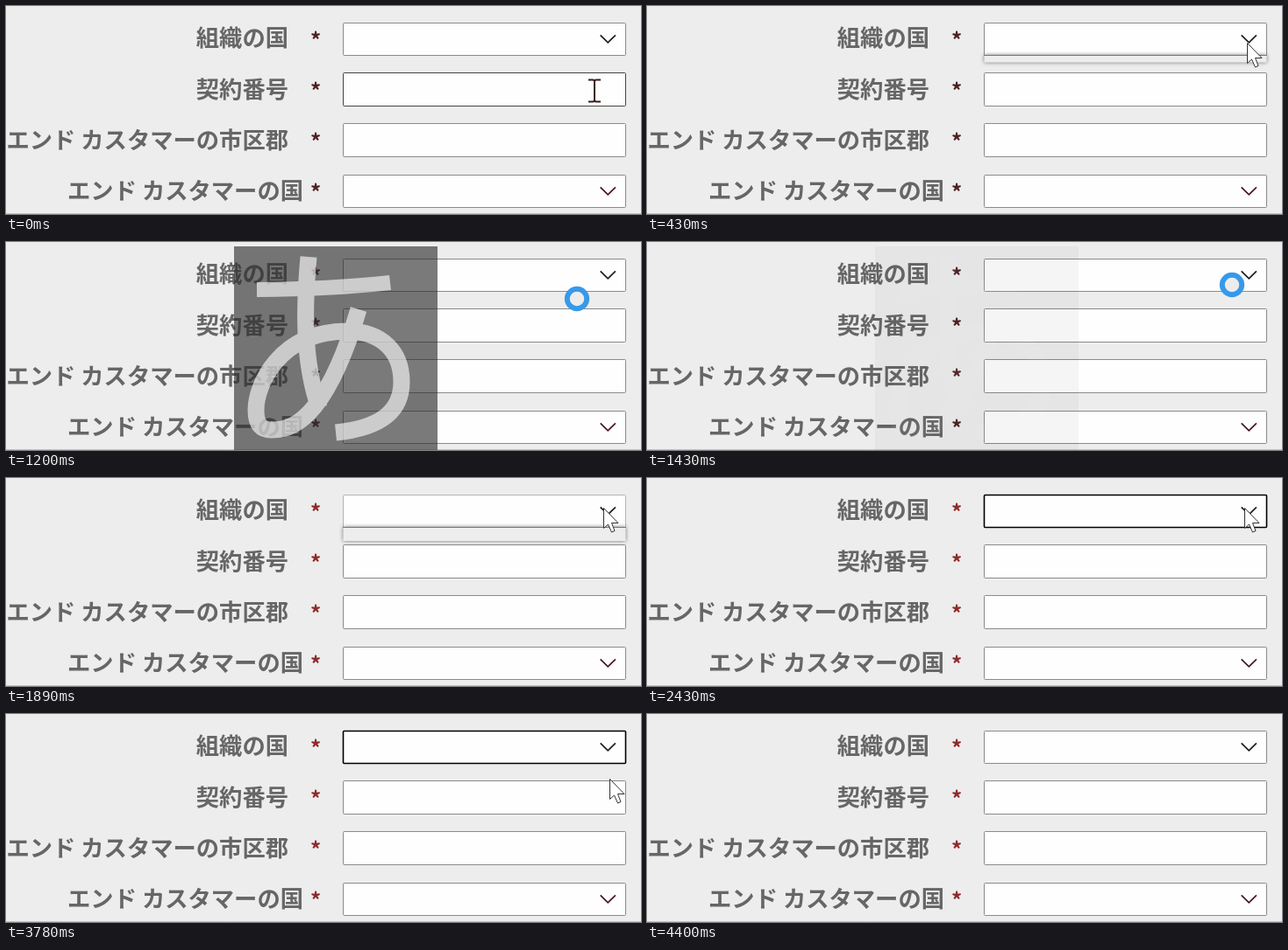
An HTML page for the animation above (4.48 s loop, 724x238 px).

```html
<!DOCTYPE html>
<html lang="ja">
<head>
<meta charset="utf-8">
<style>
  html, body { margin: 0; width: 100%; height: 100%; overflow: hidden; background: #ededed; }
  svg { display: block; width: 724px; height: 238px; }
  text { font: 700 26.3px "Noto Sans CJK JP", "Noto Sans CJK", sans-serif; fill: #666; text-anchor: end; }
  .star { font-size: 24px; text-anchor: middle; fill: var(--star); }
  .field { fill: #fefefe; stroke: #8a8a8a; }
  .field.hover { stroke: #444; }
  .field.focus { stroke: #000; stroke-width: 1.6; }
  .field.pressed { stroke: #b4b4b4; }
  .line { fill: none; stroke-width: 1.7; }
  #menu { filter: drop-shadow(.5px .5px 2px #0008); }
</style>
</head>
<body>
<svg viewBox="0 0 724 238">
  <rect width="724" height="238" fill="#ededed"/>
  <path d="M0 237.5H724" stroke="#c4c4c4"/>
  <g id="form"></g>
  <g id="menu">
    <rect id="menuBody" x="384.5" y="56.5" width="322" fill="#ededed"/>
    <path d="M384 56.5H707" stroke="#777"/>
  </g>
  <rect id="panel" x="260" y="5" width="232" height="233" fill="#2a2a2a"/>
  <g id="kana" fill="none" stroke="#fff" stroke-width="19" aria-label="あ">
    <path stroke-width="17" d="M286 54.5Q370 54 438 46.5"/>
    <path d="M345 17C340 72 338 135 357 190"/>
    <path d="M402 77C388 125 370 165 352 188C335 209 320 215 303 215C287 215 285 203 285 192C285 165 310 103 388 102C428 102 451 125 451 160C451 195 425 213 376 218"/>
  </g>
  <g id="arrow"><path d="M.5.5V23.5L5.5 19L9.5 28L13 26.5L9.5 17.5H17Z" fill="#fff" stroke="#333"/></g>
  <g id="beam"><path class="line" style="stroke-width:2" stroke="#3a1a1a"
    d="M-7-12.5h5q2 0 2 2v21q0 2-2 2h-5M7-12.5h-5q-2 0-2 2M7 12.5h-5q-2 0-2-2"/></g>
  <g id="ring"><circle r="11.2" fill="#ececec" stroke="#3799e9" stroke-width="5.9"/></g>
</svg>
<script>
const LOOP = 4480;
const $ = id => document.getElementById(id);

// label, label's right edge, field top, field height, chevron colour
const rows = [
  ['組織の国', 322, 19, 37, '#1c1c1c'],
  ['契約番号', 322, 76, 38],
  ['エンド カスタマーの市区郡', 322, 134, 38],
  ['エンド カスタマーの国', 339, 193, 37, '#48141c'],
];
$('form').innerHTML = rows.map(([label, right, top, height, chevron], i) => `
  <text x="${right}" y="${46.3 + 58.2 * i}">${label}</text>
  <text class="star" x="353" y="${47.8 + 58.2 * i}">*</text>
  <rect class="field" x="384.5" y="${top + .5}" width="322" height="${height}" rx="1"/>
  ${chevron ? `<path class="line" stroke="${chevron}" d="M677.7 ${top + 14.4}l8.6 8.5l8.6-8.5"/>` : ''}`).join('');
const fields = document.querySelectorAll('.field');

// start time, pointer, x, y
const pointerSteps = [
  [0, 'beam', 671, 97], [70, 'arrow', 683, 62], [120, 'arrow', 683, 22],
  [280, 'arrow', 683, 29], [360, 'arrow', 684, 36], [430, 'arrow', 684, 42],
  [1040, 'ring', 651, 65], [1350, 'ring', 660, 57], [1430, 'ring', 667, 49],
  [1580, 'arrow', 681, 34], [3780, 'arrow', 688, 74], [3850, 'arrow', 697, 147],
  [3930, 'none', 0, 0],
];
// start time, look of the first field, menu height
const fieldSteps = [
  [0, '', 0], [120, 'hover', 0], [280, 'focus', 0], [430, '', 8], [510, '', 15.5],
  [1040, '', 0], [1660, 'hover', 0], [1810, 'pressed', 8], [1890, 'pressed', 15.5],
  [2350, '', 0], [2430, 'focus', 0], [2910, 'pressed', 15.5], [3060, '', 15.5],
  [3390, 'pressed', 15.5], [3530, 'focus', 0], [4400, '', 0],
];
// start time, opacity of the input mode panel
const panelSteps = [
  [0, 0], [660, .88], [1040, .82], [1120, .73], [1200, .62], [1350, .3], [1430, .04], [1580, 0],
];
const current = (steps, t) => steps.findLast(step => step[0] <= t);

function draw(t) {
  const [, pointer, x, y] = current(pointerSteps, t);
  for (const id of ['arrow', 'beam', 'ring']) {
    $(id).style.display = id === pointer ? '' : 'none';
    $(id).setAttribute('transform', `translate(${x} ${y})`);
  }

  const [, look, menuHeight] = current(fieldSteps, t);
  fields[0].setAttribute('class', 'field ' + look);
  fields[1].setAttribute('class', pointer === 'beam' ? 'field hover' : 'field');
  $('menu').style.display = menuHeight ? '' : 'none';
  $('menuBody').setAttribute('height', menuHeight);

  const [, opacity] = current(panelSteps, t);
  $('panel').style.opacity = $('kana').style.opacity = opacity;
  document.body.style.setProperty('--star', t < 1810 ? '#4f2024' : '#8f2a2a');
}

const start = performance.now();
function tick() {
  draw((performance.now() - start) % LOOP);
  requestAnimationFrame(tick);
}
tick();
</script>
</body>
</html>
```
